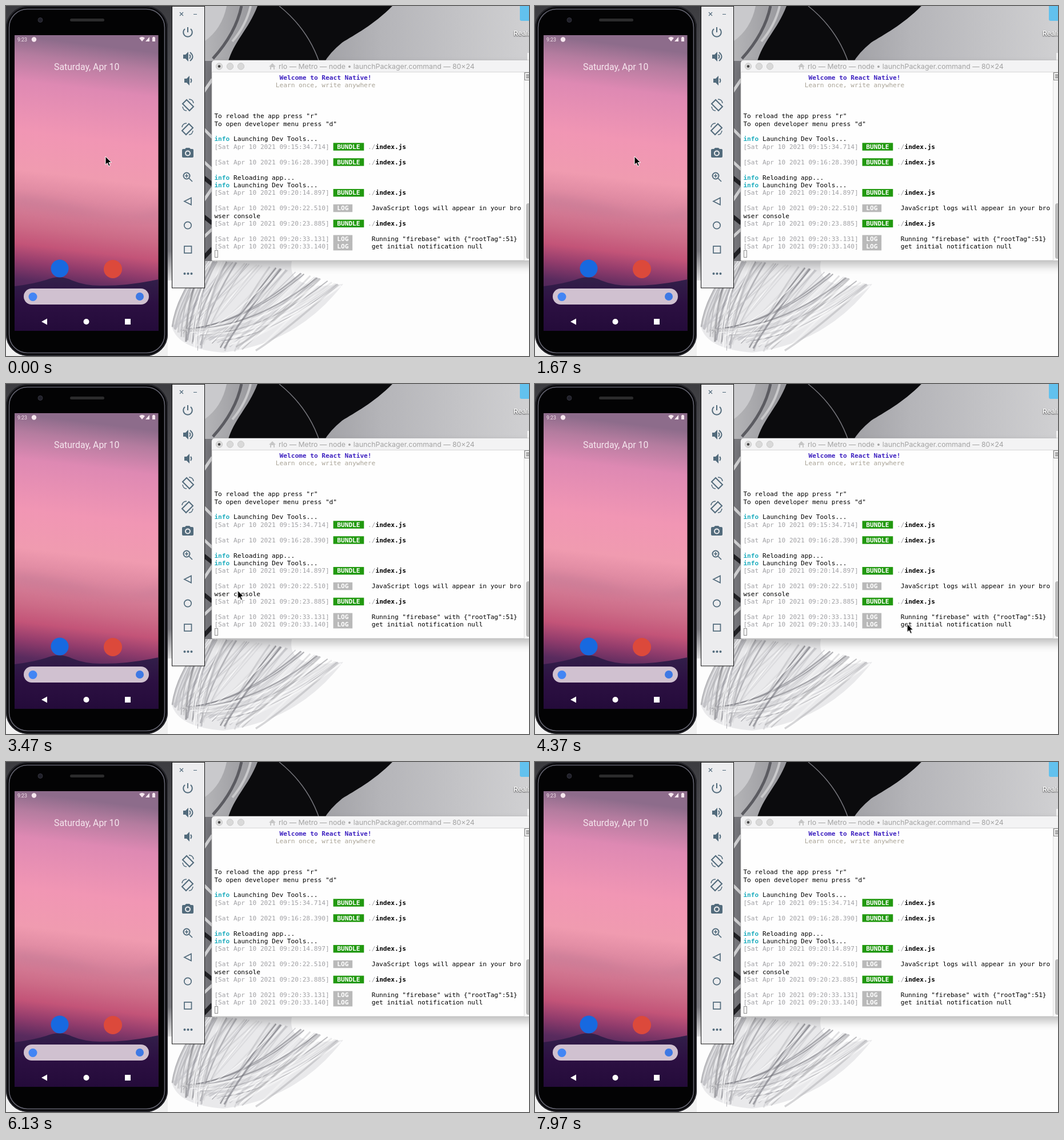
Recreate the animation shown at these times as an HTML page. Size 915 px wide and 612 px high, loop 8 s.

```html
<!DOCTYPE html>
<html lang="en">
<head>
<meta charset="utf-8">
<title>Emulator and bundler terminal</title>
<style>
  html, body { margin: 0; width: 100%; height: 100%; overflow: hidden; background: #fdfdfd; }
  svg { display: block; width: 915px; height: 612px; }
  .mono { font: 11.15px "DejaVu Sans Mono", monospace; }
  .phone-text { font-family: Roboto, sans-serif; fill: #f6e6ee; }
  .tools { fill: none; stroke: #526b7c; stroke-width: 2; }
  .tools .solid { fill: #526b7c; stroke: none; }
  #pointer { animation: travel 8s linear infinite; }
  @keyframes travel {
    0%, 31.4% { transform: translate(174px, 263px); }
    34.625% { transform: translate(215px, 267px); }
    43.375% { transform: translate(405px, 361px); animation-timing-function: cubic-bezier(.25, .4, .6, 1); }
    63.375% { transform: translate(721px, 436px); animation-timing-function: ease-in; }
    71%, 100% { transform: translate(930px, 520px); }
  }
</style>
</head>
<body>
<svg viewBox="0 0 915 612">
  <defs>
    <linearGradient id="sky" x1="0" y1="0" x2="-.06" y2="1">
      <stop offset="0" stop-color="#8d6c8b"/>
      <stop offset=".06" stop-color="#b47c9f"/>
      <stop offset=".15" stop-color="#de89b3"/>
      <stop offset=".32" stop-color="#f196b4"/>
      <stop offset=".45" stop-color="#f09bb0"/>
      <stop offset=".55" stop-color="#d9849d"/>
      <stop offset=".64" stop-color="#cc6b87"/>
      <stop offset=".7" stop-color="#c35478"/>
      <stop offset=".76" stop-color="#923c6c"/>
      <stop offset=".82" stop-color="#592b5e"/>
      <stop offset="1" stop-color="#2e1440"/>
    </linearGradient>
    <linearGradient id="hill" x2="0" y2="1">
      <stop offset="0" stop-color="#33204a"/>
      <stop offset=".5" stop-color="#2c1042"/>
      <stop offset="1" stop-color="#240b3a"/>
    </linearGradient>
    <linearGradient id="wash">
      <stop offset="0" stop-color="#b4b4b7"/>
      <stop offset=".2" stop-color="#8f8f94"/>
      <stop offset=".55" stop-color="#b5b5b9"/>
      <stop offset="1" stop-color="#d0d0d2"/>
    </linearGradient>
    <linearGradient id="edge" x2="0" y2="1">
      <stop offset="0" stop-color="#3c3c40"/>
      <stop offset=".7" stop-color="#77777c"/>
      <stop offset=".8" stop-color="#f0f0f0"/>
    </linearGradient>
    <filter id="blur" x="-20%" y="-20%" width="140%" height="140%"><feGaussianBlur stdDeviation="8"/></filter>
    <filter id="soft"><feGaussianBlur stdDeviation=".7"/></filter>
    <clipPath id="screen"><rect x="15" y="51" width="251.5" height="517"/></clipPath>
  </defs>

  <!-- desktop -->
  <rect width="915" height="612" fill="#fdfdfd"/>
  <rect width="348" height="612" fill="url(#edge)"/>
  <rect x="283" y="480" width="80" height="132" fill="#fdfdfd"/>
  <rect x="347" width="568" height="130" fill="url(#wash)"/>
  <g filter="url(#soft)">
    <path d="M440 0H676C642 34 610 50 588 64Q566 82 556 100H388C398 62 424 42 440 0Z" fill="#0b0b0d"/>
    <path d="M347 0H386Q378 40 347 62Z" fill="#c9c9cc"/>
    <path d="M428 0Q420 34 396 62" fill="none" stroke="#c9c9cb" stroke-width="4"/>
    <path d="M412 0Q402 48 362 92" fill="none" stroke="#5b5b61" stroke-width="5"/>
    <path d="M478 0Q528 40 548 98" fill="none" stroke="#77777d" stroke-width="1.5"/>
    <path d="M346 96H361V446L346 470Z" fill="#77777c"/>
    <path d="M346 150L361 128M346 215L361 230M346 272L361 286M346 340L361 318M346 404L361 390" stroke="#d4d4d6" stroke-width="5"/>
    <path d="M346 300L361 312M346 368L361 380M346 440L361 424" stroke="#222226" stroke-width="7"/>
  </g>
  <g id="strands" fill="none" filter="url(#soft)">
    <path d="M346 446H500Q490 500 590 486Q510 590 380 606Q300 600 290 560Q300 500 346 446Z" fill="#e9e9eb"/>
  </g>
  <path d="M899 0H915V26H902Q899 26 899 23Z" fill="#62c1ee"/>
  <text x="888" y="52" font-family="Inter, sans-serif" font-size="12" font-weight="600" fill="#fff"
        style="text-shadow:0 1px 2px #333">Realm</text>
  <rect x="912" y="82" width="3" height="13" fill="#f4f4f4"/>

  <!-- terminal -->
  <rect x="362" y="104" width="570" height="350" rx="6" opacity=".24" filter="url(#blur)"/>
  <path d="M360 445V101Q360 95 366 95H915V445Z" fill="#fefefe" stroke="#b4b4b4" stroke-width=".7"/>
  <path d="M360 116V101Q360 95 366 95H915V116Z" fill="#f3f3f4"/>
  <path d="M360 115.5H915" stroke="#d5d5d5"/>
  <g fill="#d9d9d9" stroke="#c2c2c2" stroke-width=".8">
    <circle cx="373" cy="105.5" r="5.7"/><circle cx="392" cy="105.5" r="5.7"/><circle cx="411" cy="105.5" r="5.7"/>
  </g>
  <circle cx="373" cy="105.5" r="2.3" fill="#444"/>
  <path d="M460 106L466 100L472 106H470V111H468V107H464V111H462V106Z" fill="#c6c6c6"/>
  <text x="477" y="110" font-family="Inter, sans-serif" font-size="12.3" fill="#a2a2a2">rlo — Metro — node • launchPackager.command — 80×24</text>
  <rect x="907" y="116" width="8" height="329" fill="#f7f7f7"/>
  <path d="M906.5 116V445" stroke="#ddd"/>
  <rect x="907.5" y="116.5" width="12" height="13" fill="#eee" stroke="#888"/>
  <path d="M910 120.5H915M910 123H915M910 125.5H915" stroke="#555"/>
  <rect x="910" y="345" width="9" height="97" rx="4" fill="#bcbcbc"/>
  <g id="console" class="mono"></g>
  <rect x="365.5" y="427.5" width="5" height="12" fill="none" stroke="#8d8d8d"/>

  <!-- phone -->
  <rect width="283" height="612" rx="38" fill="#08080a"/>
  <rect x="1" y="1" width="281" height="610" rx="37" fill="none" stroke="#25252b" stroke-width="2"/>
  <rect x="5.5" y="5.5" width="272" height="601" rx="32" fill="#030304" stroke="#62626e" stroke-width="1.6"/>
  <rect x="112" y="22" width="60" height="5" rx="2.5" fill="#2b2b2c"/>
  <circle cx="60" cy="24.5" r="4" fill="#20202a" stroke="#34343e"/>
  <g clip-path="url(#screen)">
    <rect x="15" y="51" width="252" height="517" fill="url(#sky)"/>
    <path d="M15 330Q80 335 150 357T267 351V374Q160 376 15 350Z" fill="#b1738f" opacity=".25" filter="url(#blur)"/>
    <path d="M15 490Q48 486 70 479Q94 469 116 480Q138 489 165 489Q210 490 267 478V568H15Z" fill="url(#hill)"/>
  </g>
  <g class="phone-text">
    <text x="20" y="61.5" font-size="8.8">9:23</text>
    <text x="84" y="112" font-size="15.8">Saturday, Apr 10</text>
    <circle cx="49" cy="58.5" r="4.2"/>
    <path d="M233 56Q238 52 243 56L238 62ZM244 62L251 54V62ZM256 55H257V54H260V55H261V62H256Z"/>
  </g>
  <circle cx="94" cy="459" r="15.5" fill="#1769e0"/>
  <circle cx="187" cy="460" r="16" fill="#dc493b"/>
  <rect x="31" y="494" width="219" height="28" rx="14" fill="#d0c1d0"/>
  <circle cx="47" cy="508.5" r="7.5" fill="#4285f4"/>
  <circle cx="234" cy="508" r="7" fill="#3e79e4"/>
  <path d="M62 552L72 546.5V557.5ZM208 547H218V557H208Z" fill="#fff"/>
  <circle cx="140.5" cy="552" r="5" fill="#fff"/>

  <!-- emulator controls -->
  <rect x="290.5" y=".5" width="57" height="492.5" fill="#ececee" stroke="#111"/>
  <g class="tools">
    <path d="M304 11L310 17M310 11L304 17M328 14.5H334" stroke-width="1.2"/>
    <path d="M313 40A7.8 7.8 0 1 0 323 40M318 37V46"/>
    <g id="speaker">
      <path class="solid" d="M310 85H314L319 80V97L314 92H310Z"/>
      <path d="M321 85Q324 88.5 321 92"/>
    </g>
    <path d="M322 81Q331 88.5 322 96"/>
    <use href="#speaker" x="2" y="42"/>
    <g id="rotate">
      <path d="M309 171L316 164L328 176L321 183Z"/>
      <path d="M320 163Q327 163 328 170M309 176Q310 183 316 183" stroke-width="1.5"/>
    </g>
    <use href="#rotate" transform="matrix(-1 0 0 1 636 42)"/>
    <path class="solid" d="M310 250H313L315 248H321L323 250H326Q328 250 328 252V263Q328 265 326 265H310Q308 265 308 263V252Q308 250 310 250Z"/>
    <circle cx="318" cy="257.5" r="4" fill="#526b7c" stroke="#ececee"/>
    <circle cx="316" cy="297" r="5.5"/>
    <path d="M320 301L326 307M313 297H319M316 294V300" stroke-width="1.7"/>
    <path d="M312 341.5L324 335.5V347.5Z" stroke-width="1.7"/>
    <circle cx="318" cy="383.5" r="6.2" stroke-width="1.7"/>
    <rect x="312" y="420" width="12.5" height="12" stroke-width="1.7"/>
    <g class="solid"><circle cx="312.5" cy="468" r="2"/><circle cx="318.5" cy="468" r="2"/><circle cx="324.5" cy="468" r="2"/></g>
  </g>

  <g id="pointer">
    <path d="M0 0V14.5L3.4 11.5L5.8 17L8.3 16L5.9 10.6H10.5Z" fill="#000" stroke="#fff" stroke-width="1"/>
  </g>
</svg>
<script>
  const CELL = 6.715, LINE = 13.43, LEFT = 364.4, TOP = 129;
  const consoleLayer = document.getElementById('console');
  const grey = '#a0a0a4', black = '#000';

  function add(parent, tag, attrs, text = '') {
    const node = document.createElementNS(parent.namespaceURI, tag);
    for (const key in attrs) node.setAttribute(key, attrs[key]);
    node.textContent = text;
    parent.append(node);
  }

  function write(row, col, text, fill = black, weight = 400) {
    add(consoleLayer, 'text', { x: LEFT + col * CELL, y: TOP + row * LINE, fill, 'font-weight': weight }, text);
  }

  function badge(row, label, fill) {
    add(consoleLayer, 'rect', {
      x: LEFT + 31 * CELL, y: TOP + row * LINE - 10.5,
      width: (label.length + 2) * CELL, height: LINE, fill
    });
    write(row, 32, label, '#fff', 700);
  }

  const stamp = (row, time) => write(row, 0, `[Sat Apr 10 2021 ${time}]`, grey);

  function info(row, text) {
    write(row, 0, 'info', '#20aebf', 700);
    write(row, 5, text);
  }

  function bundle(row, time) {
    stamp(row, time);
    badge(row, 'BUNDLE', '#21990f');
    write(row, 40, './', grey);
    write(row, 42, 'index.js', black, 700);
  }

  function log(row, time, text) {
    stamp(row, time);
    badge(row, 'LOG', '#b9b9b9');
    write(row, 41, text);
  }

  write(0, 17, 'Welcome to React Native!', '#3c20c0', 700);
  write(1, 16, 'Learn once, write anywhere', '#a9a396');
  write(5, 0, 'To reload the app press "r"');
  write(6, 0, 'To open developer menu press "d"');
  info(8, 'Launching Dev Tools...');
  bundle(9, '09:15:34.714');
  bundle(11, '09:16:28.390');
  info(13, 'Reloading app...');
  info(14, 'Launching Dev Tools...');
  bundle(15, '09:20:14.897');
  log(17, '09:20:22.510', 'JavaScript logs will appear in your bro');
  write(18, 0, 'wser console');
  bundle(19, '09:20:23.885');
  log(21, '09:20:33.131', 'Running "firebase" with {"rootTag":51}');
  log(22, '09:20:33.140', 'get initial notification null');

  // A fan of loose brush strokes spreading from the lower left.
  let seed = 17;
  const random = () => (seed = seed * 16807 % 2147483647) / 2147483647;
  const strands = document.getElementById('strands');
  const inks = ['#77777e', '#b4b4b8', '#c6c6ca', '#fff'];
  for (let i = 0; i < 90; i++) {
    const u = random(), v = random();
    const tip = `${345 + 245 * u} ${446 + 44 * u * u}`;
    const bend = `${296 + 160 * u + 30 * v} ${505 + 75 * u}`;
    const root = `${290 + 40 * v + 120 * u * v} ${560 + 45 * v}`;
    add(strands, 'path', {
      d: `M${tip}Q${bend} ${root}`, stroke: inks[Math.floor(random() * 4)],
      'stroke-width': 1 + 2.5 * random(), opacity: .3 + .4 * random()
    });
  }
</script>
</body>
</html>
```
